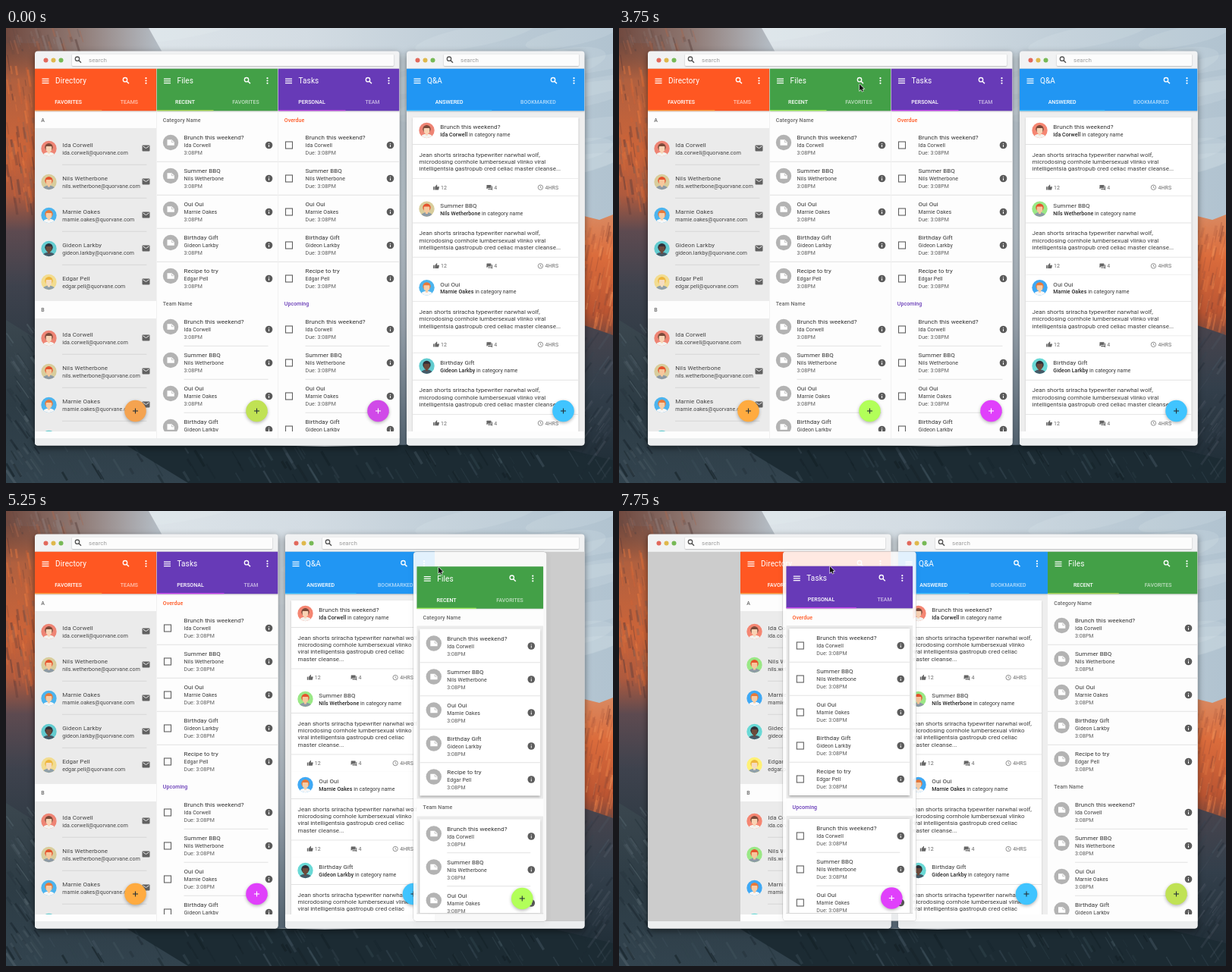
These frames come from a looping animation (800x600 px, 8000 ms). An HTML page with a canvas:

```html
<!DOCTYPE html>
<html lang="en">
<head>
<meta charset="utf-8">
<title>Dockable panels</title>
<style>
  html, body { margin: 0; width: 100%; height: 100%; overflow: hidden; }
  canvas { display: block; }
</style>
</head>
<body>
<canvas id="stage" width="800" height="600"></canvas>
<script>
const LOOP = 8000;
const canvas = document.getElementById('stage');
let c = canvas.getContext('2d');

const people = [
  { name: 'Ida Corwell', bg: ['#ee8474', '#f58672'], hair: '#7a4a3a', skin: '#f9d3b4', shirt: '#f3f3f0' },
  { name: 'Nils Wetherbone', bg: ['#d8cd9c', '#9ae886'], hair: '#e5532d', skin: '#f6c79c', shirt: '#8d9aa5' },
  { name: 'Marnie Oakes', bg: ['#4cb4ee', '#3fa9f5'], hair: '#e8793a', skin: '#f8cda6', shirt: '#f7f7f7' },
  { name: 'Gideon Larkby', bg: ['#62cbcf', '#6ad9d6'], hair: '#2f3038', skin: '#6b4a3c', shirt: '#455a68' },
  { name: 'Edgar Pell', bg: ['#f2dc90', '#fff176'], hair: '#eeb63c', skin: '#f5dcc0', shirt: '#8fa0aa' },
];
const email = p => p.name.toLowerCase().replace(' ', '.') + '@quorvane.com';
const topics = ['Brunch this weekend?', 'Summer BBQ', 'Oui Oui', 'Birthday Gift', 'Recipe to try'];
const post = 'Jean shorts sriracha typewriter narwhal wolf, microdosing cornhole lumbersexual vlinko viral intelligentsia gastropub cred celiac master cleanse...';

// accent: before and after the colours turn vivid; tabShift moves the tab boundary off centre
const panels = {
  directory: { title: 'Directory', color: '#ff5722', accent: ['#f4a350', '#ffab40'], tabs: ['FAVORITES', 'TEAMS'], tabShift: 8,
    groups: [['A', '#666'], ['B', '#666']] },
  files: { title: 'Files', color: '#43a047', accent: ['#c0e254', '#b2ff59'], tabs: ['RECENT', 'FAVORITES'], tabShift: -5,
    groups: [['Category Name', '#666'], ['Team Name', '#666']] },
  tasks: { title: 'Tasks', color: '#673ab7', accent: ['#d04ae8', '#e040fb'], tabs: ['PERSONAL', 'TEAM'], tabShift: 9,
    groups: [['Overdue', '#ff5722'], ['Upcoming', '#673ab7']] },
  qa: { title: 'Q&A', color: '#2196f3', accent: ['#40c4ff', '#40c4ff'], tabs: ['ANSWERED', 'BOOKMARKED'], tabShift: -5 },
};

// [time, changes]: windows and docked panels are [x, width]; drag is [panel, x, y]
const layout = [
  [0, { left: [38, 480.5], right: [528, 234.5], directory: [38, 160.5], files: [198.5, 160], tasks: [358.5, 160], qa: [528, 234.5], drag: null }],
  [4000, { files: null, tasks: [198.5, 160], drag: ['files', 310, 53] }],
  [4250, { drag: ['files', 333.5, 54] }],
  [4500, { directory: [38, 192.5], tasks: [230.5, 192] }],
  [4750, { drag: ['files', 332, 53] }],
  [5000, { drag: ['files', 438, 55.5] }],
  [5250, { left: [38, 320.5], right: [368, 394.5], directory: [38, 160.5], tasks: [198.5, 160], qa: [368, 197], drag: ['files', 537, 54] }],
  [5500, { drag: ['files', 530, 54.5] }],
  [5750, { qa: [368, 226] }],
  [6000, { qa: [368, 259] }],
  [6250, { qa: [368, 197], files: [565, 197.5], drag: null }],
  [7500, { tasks: null, drag: ['tasks', 205, 53] }],
  [7750, { directory: [160, 198.5], drag: ['tasks', 216, 53.5] }],
];
const pointer = [
  [1500, 215, 11], [1750, 91, 67], [2000, 85, 69], [2250, 86, 69], [2500, 85, 69], [2750, 160, 75],
  [3000, 231, 72], [3750, 317, 74], [4000, 342, 73], [4250, 366, 73], [5000, 510, 75], [5250, 570, 74],
  [5500, 564, 74], [6000, 563, 74], [6250, 553, 75], [6500, 367, 73], [6750, 258, 72], [7000, 242, 72], [7750, 278, 73],
];

function rect(x, y, w, h, color, radius = 0) {
  c.fillStyle = color;
  c.beginPath();
  c.roundRect(x, y, w, h, radius);
  c.fill();
}
function circle(x, y, r, color) {
  c.fillStyle = color;
  c.beginPath();
  c.arc(x, y, r, 0, 7);
  c.fill();
}
function ellipse(x, y, rx, ry, color, tilt = 0) {
  c.fillStyle = color;
  c.beginPath();
  c.ellipse(x, y, rx, ry, tilt, 0, 7);
  c.fill();
}
function poly(points, color) {
  c.fillStyle = color;
  c.beginPath();
  for (let i = 0; i < points.length; i += 2) c.lineTo(points[i], points[i + 1]);
  c.fill();
}
function stroke(points, color, width = 1) {
  c.strokeStyle = color;
  c.lineWidth = width;
  c.beginPath();
  for (let i = 0; i < points.length; i += 2) c.lineTo(points[i], points[i + 1]);
  c.stroke();
}
function ring(x, y, r, color, width) {
  c.strokeStyle = color;
  c.lineWidth = width;
  c.beginPath();
  c.arc(x, y, r, 0, 7);
  c.stroke();
}
function text(s, x, y, size, color, weight = 400, spacing = 0.08, align = 'left') {
  c.font = `${weight} ${size}px Roboto, sans-serif`;
  c.letterSpacing = spacing + 'px';
  c.textAlign = align;
  c.fillStyle = color;
  c.fillText(s, x, y);
  return c.measureText(s).width;
}
function shadowed(blur, dy, alpha, draw) {
  c.save();
  c.shadowColor = `rgba(0,0,0,${alpha})`;
  c.shadowBlur = blur;
  c.shadowOffsetY = dy;
  draw();
  c.restore();
}
function clipped(x, y, w, h, draw) {
  c.save();
  c.beginPath();
  c.rect(x, y, w, h);
  c.clip();
  draw();
  c.restore();
}
function gradient(x0, y0, x1, y1, ...stops) {
  const g = c.createLinearGradient(x0, y0, x1, y1);
  stops.forEach(([at, color]) => g.addColorStop(at, color));
  return g;
}

function magnifier(x, y, color) {
  ring(x - 1, y - 1, 2.7, color, 1.3);
  stroke([x + 1, y + 1, x + 4, y + 4], color, 1.5);
}
function avatar(i, x, y, vivid) {
  const p = people[i];
  c.save();
  c.beginPath();
  c.arc(x, y, 10.2, 0, 7);
  c.clip();
  rect(x - 11, y - 11, 22, 22, p.bg[+vivid]);
  ellipse(x, y + 10, 8, 5.5, p.shirt);
  circle(x, y - 1.8, 5.2, p.hair);
  rect(x - 1.5, y + 2, 3, 4.5, p.skin);
  rect(x - 3.8, y - 3, 7.6, 7.4, p.skin, [1, 1, 3.6, 3.6]);
  c.restore();
}
function mail(x, y) {
  rect(x - 5, y - 4, 10, 8, '#616161', 1);
  stroke([x - 4, y - 2.6, x, y, x + 4, y - 2.6], '#ebebeb', 1);
}
function info(x, y) {
  circle(x, y, 4.8, '#5c5c5c');
  rect(x - 0.5, y - 2.5, 1, 1.1, '#fff');
  rect(x - 0.5, y - 0.5, 1, 3, '#fff');
}
function note(x, y) {
  circle(x, y, 10.2, '#b3b3b3');
  poly([x - 4.5, y - 3.8, x + 1.5, y - 3.8, x + 4.8, y - 0.6, x + 4.8, y + 3.8, x - 4.5, y + 3.8], '#fff');
  stroke([x + 1.3, y - 3, x + 1.3, y - 0.3, x + 4, y - 0.3], '#b3b3b3', 0.7);
}
function plusButton(x, y, color, plus) {
  shadowed(4, 1.5, 0.3, () => circle(x, y, 14.3, color));
  stroke([x - 3.5, y, x + 3.5, y], plus, 1.1);
  stroke([x, y - 3.5, x, y + 3.5], plus, 1.1);
}

function toolbar(p, x, w, accent) {
  shadowed(2, 0.5, 0.25, () => rect(x, 53.7, w, 55.6, p.color));
  for (const y of [66.6, 69.3, 72]) rect(x + 9.5, y, 9, 1.2, '#fff');
  text(p.title, x + 27, 73.2, 10, '#fff', 400, 0.12);
  magnifier(x + w - 40.5, 69.2, '#fff');
  for (const y of [66.2, 69.5, 72.8]) circle(x + w - 14, y, 1.1, '#fff');
  const split = w / 2 + p.tabShift;
  text(p.tabs[0], x + split / 2, 100, 7, '#fff', 500, 0, 'center');
  text(p.tabs[1], x + (split + w) / 2, 100, 7, 'rgba(255,255,255,.65)', 500, 0, 'center');
  rect(x, 108.2, split, 1.1, accent);
}

function listRow(id, i, x, y, w, vivid) {
  const p = people[i];
  if (id === 'directory') {
    avatar(i, x + 18.5, y + 23, vivid);
    text(p.name, x + 36.3, y + 20.6, 8, '#444');
    text(email(p), x + 36.3, y + 30.6, 7, '#444');
    mail(x + w - 14, y + 22.5);
    return;
  }
  if (id === 'files') note(x + 18.5, y + 19);
  else {
    c.strokeStyle = '#606060';
    c.lineWidth = 1.1;
    c.strokeRect(x + 10, y + 18, 9, 9);
  }
  text(topics[i], x + 36, y + 15, 8, '#333');
  text(p.name, x + 36, y + 25, 7, '#3c3c3c');
  text((id === 'tasks' ? 'Due: ' : '') + '3:08PM', x + 36, y + 35, 7, '#5c5c5c');
  info(x + w - 12, y + 22.5);
}

function list(id, x, w, lifted, vivid) {
  const contacts = id === 'directory';
  const pad = lifted || contacts ? 4 : 0;
  const inset = lifted ? 4 : 0;
  let y = 110;
  panels[id].groups.forEach(([label, color], g) => {
    text(label, x + 8.3, y + 13.5, 7, color, 500);
    y += 22 + g;
    if (pad) rect(x, y, w, 220 + 2 * pad, '#ebebeb');
    y += pad - (contacts ? g : 0);
    if (lifted) shadowed(3, 1, 0.4, () => rect(x + inset, y, w - 2 * inset, 220, '#fff'));
    for (let i = 0; i < 5; i++) {
      if (i) {
        const full = !contacts && !g;
        const from = x + inset + (full ? 0 : 36);
        rect(from, y - 0.2, x + w - inset - (full ? 0 : 13) - from, 0.9, contacts ? '#d6d6d6' : '#e2e2e2');
      }
      listRow(id, i, x + inset, y, w - 2 * inset, vivid);
      y += 44;
    }
    y += pad;
  });
}

function wrap(s, width) {
  c.font = '400 8px Roboto, sans-serif';
  c.letterSpacing = '0px';
  const lines = [''];
  for (const word of s.split(' ')) {
    const joined = (lines.at(-1) + ' ' + word).trim();
    if (c.measureText(joined).width > width) lines.push(word);
    else lines[lines.length - 1] = joined;
  }
  return lines;
}
function stat(kind, x, y, label) {
  const gray = '#666';
  if (kind === 'likes') {
    rect(x - 4, y - 1, 1.6, 4.2, gray);
    poly([x - 1.8, y + 3.2, x - 1.8, y - 0.8, x + 0.6, y - 3.8, x + 1.3, y - 3, x + 0.9, y - 1, x + 4, y - 1, x + 3, y + 3.2], gray);
  } else if (kind === 'replies') {
    rect(x - 3.8, y - 3.2, 6, 4, gray, 0.5);
    poly([x - 3.8, y, x - 3.8, y + 2.4, x - 1.8, y + 0.5], gray);
    poly([x - 2, y + 1.6, x + 2.8, y + 1.6, x + 2.8, y - 1.6, x + 3.8, y - 1.6, x + 3.8, y + 4, x + 2.4, y + 2.8, x - 2, y + 2.8], gray);
  } else {
    ring(x, y, 3.2, '#777', 0.8);
    stroke([x, y - 1.9, x, y + 0.2, x + 1.5, y + 1], '#777', 0.7);
  }
  text(label, x + 6, y + 2.6, 7, gray);
}
function feed(x, w, vivid) {
  rect(x, 109.5, w, 422.5, '#eeeeee');
  const lines = wrap(post, w - 32);
  const extra = (lines.length - 3) * 9.4;
  let y = 118;
  for (let i = 0; i < 4; i++) {
    shadowed(2, 0.5, 0.2, () => rect(x + 8, y, w - 16, 103.6 + extra, '#fff'));
    avatar(i, x + 26.5, y + 17, vivid);
    text(topics[i], x + 44.3, y + 15.3, 8, '#333');
    const nameWidth = text(people[i].name, x + 44.3, y + 25, 7, '#222', 500);
    text(' in category name', x + 44.3 + nameWidth, y + 25, 7, '#333', 400, 0.04);
    rect(x + 8, y + 35, w - 16, 0.9, '#e2e2e2');
    lines.forEach((line, n) => text(line, x + 16.5, y + 51.6 + n * 9.4, 8, '#3c3c3c', 400, 0));
    const foot = y + 92.2 + extra;
    rect(x + 8, foot - 12, w - 16, 0.9, '#e6e6e6');
    stat('likes', x + w / 6, foot, '12');
    stat('replies', x + w / 2 - 8, foot, '4');
    stat('age', x + w * 5 / 6 - 19, foot, '4HRS');
    y += 103.6 + extra;
  }
}

function panel(id, x, w, lifted, t) {
  const p = panels[id];
  const vivid = t >= 2500 && !(id === 'files' && t >= 7500);
  const accent = p.accent[+vivid];
  const bottom = lifted ? 511 : 532;
  rect(x, 53.7, w, (lifted ? bottom : 541) - 53.7, '#fdfdfd');
  clipped(x, 53, w, bottom - 53, () => {
    if (id === 'qa') feed(x, w, vivid);
    else list(id, x, w, lifted, t >= 7500);
    toolbar(p, x, w, accent);
  });
  if (lifted) rect(x, bottom, w, 0.8, '#ccc');
  plusButton(x + w - 28, lifted ? 491.5 : 505, accent, id === 'tasks' ? '#fff' : '#263238');
}
function draggedPanel(id, x, y, t) {
  shadowed(7, 2, 0.5, () => {
    c.strokeStyle = 'rgba(120,120,120,.5)';
    c.lineWidth = 0.8;
    c.beginPath();
    c.roundRect(x, y, 175.5, 487, 4);
    c.stroke();
  });
  rect(x, y, 175.5, 487, 'rgba(255,255,255,.87)', 4);
  c.save();
  c.translate(0, y - 34.5);
  panel(id, x + 4.3, 167, true, t);
  c.restore();
}

function windowFrame([x, w]) {
  shadowed(9, 3, 0.5, () => rect(x, 30.5, w, 520, '#f1f2f3', 4));
  rect(x, 541, w, 9.5, '#eceeef', [0, 0, 4, 4]);
  ['#e2695c', '#dfb84c', '#77b956'].forEach((color, i) => circle(x + 14.5 + i * 10, 42.5, 3, color));
  shadowed(1.5, 0.5, 0.35, () => rect(x + 49, 34.5, w - 56.5, 15.5, '#fcfcfc', 1));
  magnifier(x + 57, 41.7, '#555');
  text('search', x + 71, 44.7, 8, '#a0a0a0', 400, 0);
  rect(x, 53.7, w, 487.3, '#cccccc');
}

function arrow(x, y) {
  const shape = [x, y, x, y + 8.6, x + 2, y + 6.8, x + 3.4, y + 9.8, x + 4.8, y + 9.2, x + 3.6, y + 6.3, x + 6, y + 6.1];
  stroke([...shape, x, y], 'rgba(255,255,255,.9)', 1.2);
  poly(shape, '#111');
}

function paintWallpaper() {
  let seed = 7;
  const random = () => (seed = (seed * 16807) % 2147483647) / 2147483647;
  const streaks = (count, x, y, w, h, colors, lean) => {
    for (let i = 0; i < count; i++) {
      const sx = x + random() * w, sy = y + random() * h, len = 6 + random() * 18;
      c.globalAlpha = 0.15 + random() * 0.4;
      stroke([sx, sy, sx + len * lean, sy + len], colors[i % colors.length], 1 + random() * 2.5);
    }
    c.globalAlpha = 1;
  };
  // sky, clouds and valley mist
  rect(0, 0, 800, 600, gradient(180, 0, 800, 0, [0, '#dde4e9'], [0.35, '#d3dce3'], [0.65, '#c0ced8'], [1, '#b1c3d0']));
  for (let i = 0; i < 30; i++)
    ellipse(200 + random() * 600, random() * 200, 40 + random() * 60, 8 + random() * 12, 'rgba(236,241,245,.12)', -0.2);
  rect(300, 240, 400, 310, gradient(0, 240, 0, 550, [0, 'rgba(190,200,210,0)'], [0.5, '#a9b5c1'], [1, '#5f7180']));
  // left cliff, paling toward its lit rim
  poly([0, 0, 188, 0, 206, 32, 270, 240, 330, 420, 0, 480],
    gradient(0, 0, 200, 0, [0, '#70493f'], [0.45, '#8d7670'], [1, '#b4bcc4']));
  rect(0, 20, 45, 400, gradient(0, 20, 0, 420, [0, 'rgba(125,75,58,.4)'], [0.12, '#b0603f'], [0.35, '#cb6439'], [0.5, '#ae5a3e'], [0.62, '#5d4a50'], [0.8, '#3e424d'], [1, '#303b45']));
  streaks(110, 0, 35, 36, 190, ['#e5783f', '#5d3b38', '#cf6336', '#94624f'], 0.15);
  streaks(40, 0, 0, 100, 22, ['#a9674d', '#5d4541', '#8f7f7c'], 0.3);
  // right cliff
  poly([700, 300, 762, 248, 782, 253, 800, 246, 800, 430, 700, 430], gradient(0, 245, 0, 430, [0, '#d98a62'], [0.3, '#db6c3c'], [0.7, '#bb5532'], [1, '#4b4044']));
  streaks(80, 762, 256, 40, 130, ['#f0935c', '#8a4533', '#e27a45', '#a9553a'], -0.2);
  poly([690, 395, 762, 392, 800, 405, 800, 600, 640, 600], gradient(0, 392, 0, 600, [0, '#48444d'], [0.4, '#333f4b'], [1, '#1c2a33']));
  // dark slopes and forest floor
  poly([0, 385, 40, 410, 230, 535, 330, 600, 0, 600], gradient(0, 390, 0, 600, [0, '#3a464e'], [0.5, '#2d3c45'], [1, '#32434e']));
  poly([150, 545, 420, 552, 700, 546, 800, 570, 800, 600, 240, 600], '#1c2b33');
  streaks(70, 0, 390, 38, 200, ['#5a6a72', '#18242c', '#40505a'], 0.7);
  streaks(110, 0, 550, 800, 40, ['#33464f', '#101b20', '#42545f'], 0.6);
  streaks(50, 762, 400, 38, 180, ['#505a66', '#202b35', '#394551'], -0.7);
}

const wallpaper = new OffscreenCanvas(800, 600);
const screen = c;
c = wallpaper.getContext('2d');
paintWallpaper();
c = screen;

function draw() {
  const t = performance.now() % LOOP;
  const state = Object.assign({}, ...layout.filter(([at]) => at <= t).map(([, change]) => change));
  c.drawImage(wallpaper, 0, 0);
  windowFrame(state.left);
  windowFrame(state.right);
  for (const id in panels) if (state[id]) panel(id, ...state[id], false, t);
  if (state.drag) draggedPanel(...state.drag, t);
  const tip = pointer.findLast(([at]) => at <= t);
  if (tip) arrow(tip[1], tip[2]);
  requestAnimationFrame(draw);
}
draw();
</script>
</body>
</html>
```
